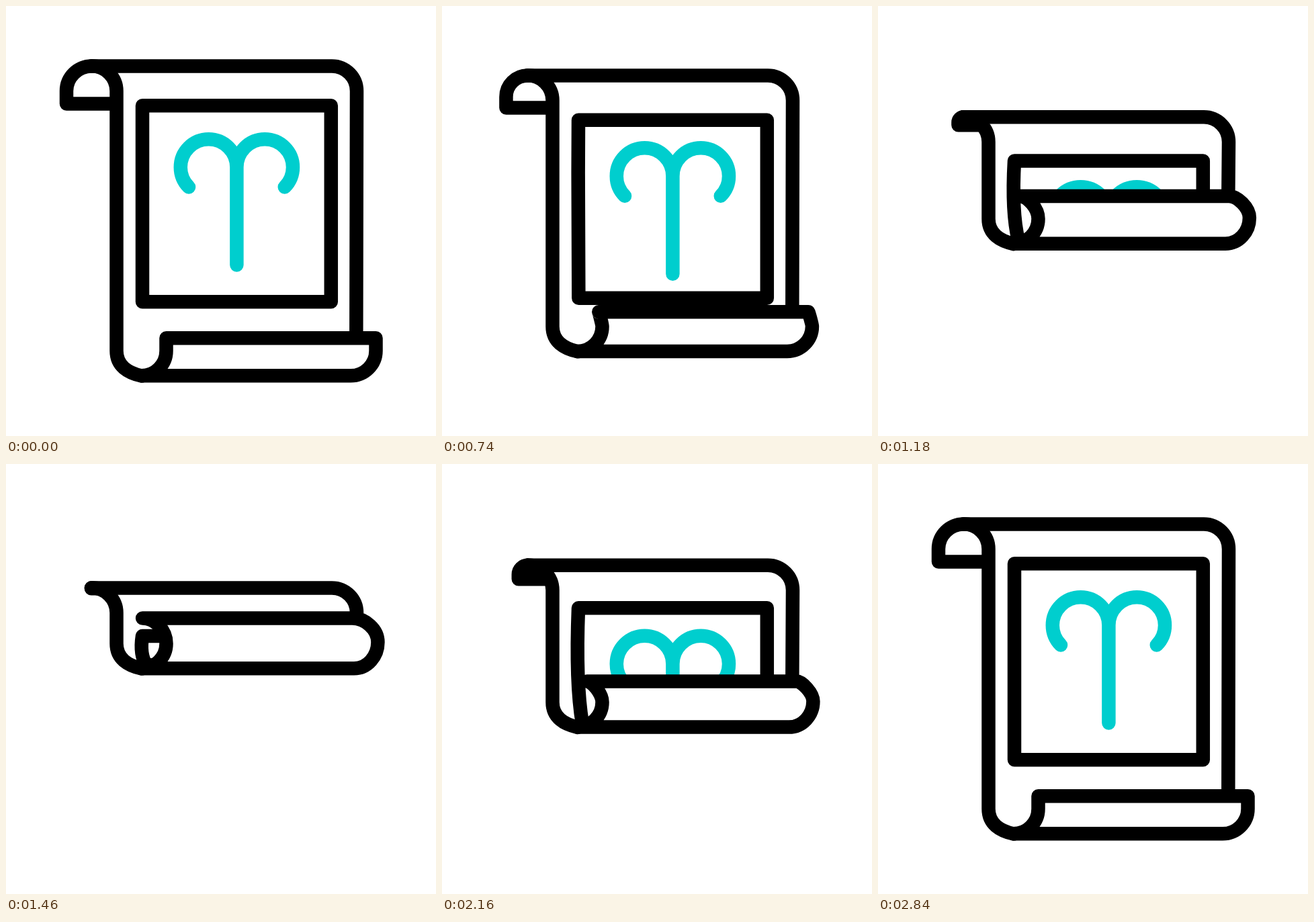
An HTML page with a canvas for the animation above (3600 ms loop, 640 by 640 pixels).

```html
<!DOCTYPE html>
<html lang="en">
<head>
<meta charset="utf-8">
<title>Aries scroll</title>
<style>
  html, body { margin: 0; width: 100%; height: 100%; overflow: hidden; background: #fff; }
  canvas { display: block; width: 640px; height: 640px; }
</style>
</head>
<body>
<canvas id="stage" width="640" height="640"></canvas>
<script>
const ctx = document.getElementById('stage').getContext('2d');
const LOOP = 3600, STEP = 20;
const CLOSE_AT = 400, OPEN_AT = 1650, DURATION = 1183;
const INK = '#000', TEAL = '#00cece';
const QUARTER = Math.PI / 2;

const clamp = v => Math.max(0, Math.min(1, v));

// cubic-bezier(.5, 0, .5, 1)
function ease(x) {
  let lo = 0, hi = 1;
  for (let i = 0; i < 30; i++) {
    const s = (lo + hi) / 2;
    if (1.5 * s - 1.5 * s * s + s * s * s < x) lo = s; else hi = s;
  }
  return lo * lo * (3 - 2 * lo);
}

// 0 = unrolled, 1 = rolled up
function rollAmount(t) {
  if (t <= CLOSE_AT || t >= OPEN_AT + DURATION) return 0;
  return t < OPEN_AT
    ? ease(clamp((t - CLOSE_AT) / DURATION))
    : 1 - ease(clamp((t - OPEN_AT) / DURATION));
}

function track(points, x) {
  let i = 1;
  while (i < points.length - 1 && x > points[i][0]) i++;
  const [x0, y0] = points[i - 1], [x1, y1] = points[i];
  return y0 + (y1 - y0) * (x - x0) / (x1 - x0);
}

const FRAME_DROP = [[0, 0], [0.145, 21.5], [0.644, 67], [0.784, 82], [0.958, 104], [1, 110]];

function drawSheet(p, top, bottom, rim) {
  ctx.beginPath();
  ctx.moveTo(127, top);
  ctx.lineTo(485, top);
  ctx.arc(485, top + 37, 37, -QUARTER, 0);
  ctx.lineTo(521.3, rim);
  ctx.stroke();

  ctx.beginPath();
  ctx.arc(127.3, top + 37, 37.2, -QUARTER, 0);
  ctx.lineTo(164.5, bottom - 37);
  ctx.bezierCurveTo(164.5, bottom - 14, 182, bottom - 4, 202, bottom + 0.3);
  ctx.stroke();

  // curl at the top left
  const open = 1 - p;
  ctx.beginPath();
  ctx.ellipse(127.5, top + 37 * open, 37.5 * open, 37 * open, 0, -QUARTER, -2 * QUARTER, true);
  ctx.lineTo(127.5 - 37.5 * open, top + 56 * open);
  ctx.lineTo(155, top + 56 * open);
  ctx.stroke();
}

function drawFrame(p, bottom) {
  const top = 148.2 + track(FRAME_DROP, p);
  const base = Math.min(440.3 - 38 * p, bottom - 5);
  const bend = Math.min(1, p / 0.6);
  const side = 203 - 2.3 * bend, height = base - top;
  ctx.beginPath();
  ctx.moveTo(203, top);
  ctx.lineTo(483.8, top);
  ctx.lineTo(483.8, base);
  ctx.lineTo(203 + 6 * bend * bend, base);
  ctx.bezierCurveTo(side, top + height * 0.72, side, top + height * 0.34, 203, top);
  ctx.closePath();
  ctx.stroke();
}

function drawGlyph(p, rim) {
  ctx.save();
  ctx.beginPath();
  ctx.rect(0, 0, 640, rim);
  ctx.clip();
  ctx.translate(0, 90.5 * p);
  ctx.strokeStyle = TEAL;
  ctx.beginPath();
  ctx.arc(301.6, 240, 41.8, 1.5 * QUARTER, 4 * QUARTER);
  ctx.lineTo(343.4, 385.5);
  ctx.moveTo(343.4, 240);
  ctx.arc(385.2, 240, 41.8, 2 * QUARTER, 4.5 * QUARTER);
  ctx.stroke();
  ctx.restore();
}

function drawRoll(p, bottom, rim) {
  const left = 238.5 - 36 * p, right = 550.5 - 36 * p;
  const rightMid = 550.5 + 3 * p, rightBase = 513 + 5 * p;
  const mid = bottom - 37, rightMidY = mid - 2 * p;
  const lift = 20 * p, reach = 20 * p * p;
  ctx.beginPath();
  ctx.moveTo(202, bottom);
  ctx.arc(201.5, mid, 37, QUARTER, 0, true);
  ctx.bezierCurveTo(238.5, mid - lift, left + reach, rim, left, rim);
  ctx.lineTo(right, rim);
  ctx.bezierCurveTo(right + reach, rim, rightMid, rightMidY - lift, rightMid, rightMidY);
  ctx.bezierCurveTo(rightMid, rightMidY + 20.5, rightBase + 20.5, bottom, rightBase, bottom);
  ctx.closePath();
  ctx.fillStyle = '#fff';
  ctx.fill();
  ctx.stroke();
}

function draw(now) {
  const t = Math.floor((now % LOOP) / STEP) * STEP;
  const p = rollAmount(t);
  const top = 89.5 + 96.5 * p;
  const bottom = 550.3 - 250 * p;
  const rim = bottom - 56 - 19 * p;

  ctx.fillStyle = '#fff';
  ctx.fillRect(0, 0, 640, 640);
  ctx.strokeStyle = INK;
  ctx.lineWidth = 20.5;
  ctx.lineCap = ctx.lineJoin = 'round';

  drawSheet(p, top, bottom, rim);
  drawFrame(p, bottom);
  drawGlyph(p, rim);
  drawRoll(p, bottom, rim);
}

const start = performance.now();
function tick() {
  draw(performance.now() - start);
  requestAnimationFrame(tick);
}
tick();
</script>
</body>
</html>
```
